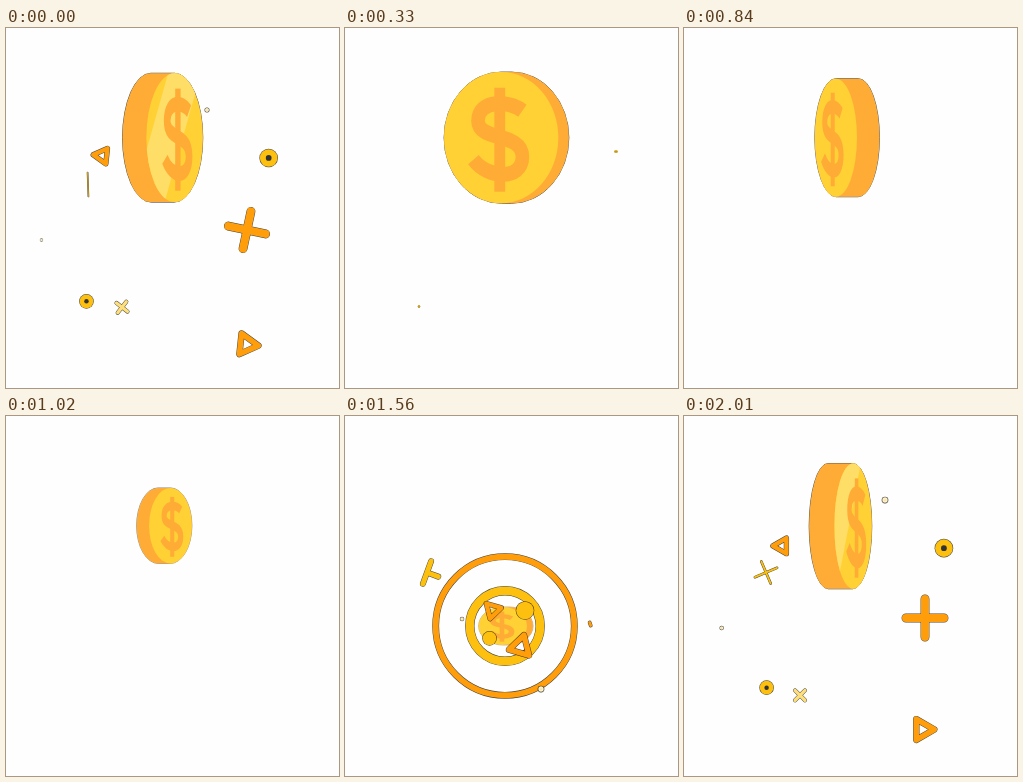
An HTML page with a canvas for the animation above (2.04 s loop, 333 by 360 pixels).

```html
<!DOCTYPE html>
<html>
<head>
<meta charset="utf-8">
<style>
html, body { margin: 0; height: 100%; overflow: hidden; background: #fefefe; }
canvas { display: block; }
</style>
</head>
<body>
<canvas id="stage" width="333" height="360"></canvas>
<script>
const ctx = document.getElementById('stage').getContext('2d');
const LOOP = 2040, START = 1300, CX = 160, CY = 210;
const ORANGE = '#ff9d0a', YELLOW = '#fdc00f', PALE = '#ffdf7b';
const FACE = '#ffd135', RIM = '#ffac37', SHINE = '#ffde68', EDGE = '#000b';
const DOLLAR = new Path2D('M25 -27C12 -37 -24 -39 -24 -17C-24 4 25 -6 25 19C25 43 -14 41 -29 22');
const DEG = Math.PI / 180;

const clamp = u => Math.min(1, Math.max(0, u));
const sineIn = u => 1 - Math.cos(clamp(u) * Math.PI / 2);
const sineInOut = u => (1 - Math.cos(clamp(u) * Math.PI)) / 2;

// Linear keyframes: time, value, time, value, ...
function key(t, ...k) {
  if (t <= k[0]) return k[1];
  for (let i = 2; i < k.length; i += 2)
    if (t < k[i]) return k[i - 1] + (k[i + 1] - k[i - 1]) * (t - k[i - 2]) / (k[i] - k[i - 2]);
  return k[k.length - 1];
}

// Stroke the current path with a fine dark edge
function outline(color, width) {
  ctx.lineCap = ctx.lineJoin = 'round';
  ctx.strokeStyle = EDGE;
  ctx.lineWidth = width + 0.9;
  ctx.stroke();
  ctx.strokeStyle = color;
  ctx.lineWidth = width;
  ctx.stroke();
}

function at(x, y, angle, scale, draw) {
  if (scale <= 0) return;
  ctx.save();
  ctx.translate(x, y);
  ctx.rotate(angle * DEG);
  ctx.scale(scale, scale);
  draw();
  ctx.restore();
}

// r is the outer radius
function ring(r, color) {
  if (r <= 0 || r > 136) return;
  const width = Math.min(11.5 - 0.077 * r, r);
  ctx.beginPath();
  ctx.arc(CX, CY, r - width / 2, 0, 7);
  outline(color, width);
}

function triangle(x, y, angle, scale, r, width) {
  at(x, y, angle, scale, () => {
    ctx.beginPath();
    for (let i = 0; i < 3; i++)
      ctx.lineTo(r * Math.cos(i * 120 * DEG), r * Math.sin(i * 120 * DEG));
    ctx.closePath();
    outline(ORANGE, width);
  });
}

// Two bars; each is drawn from one end to the other
function cross(x, y, angle, scale, arm, width, color, first = 1, second = 1) {
  at(x, y, angle, scale, () => {
    ctx.beginPath();
    if (first > 0) {
      ctx.moveTo(0, arm);
      ctx.lineTo(0, arm - 2 * arm * first);
    }
    if (second > 0) {
      ctx.moveTo(arm, 0);
      ctx.lineTo(arm - 2 * arm * second, 0);
    }
    outline(color, width);
  });
}

function disc(r, color) {
  ctx.beginPath();
  ctx.arc(0, 0, r, 0, 7);
  ctx.fillStyle = color;
  ctx.fill();
}

function dot(x, y, scale, r, hole) {
  at(x, y, 0, scale, () => {
    disc(r + 0.3, EDGE);
    disc(r - 0.2, YELLOW);
    disc(r * 0.32 * hole, '#333');
  });
}

function spark(x, y, scale) {
  at(x, y, 0, scale, () => {
    ctx.beginPath();
    ctx.arc(0, 0, 1, 0, 7);
    outline('#fff0c0', 1.6);
  });
}

function coin(t) {
  const shrink = 1 - sineIn((t - 2720) / 558);
  const sx = shrink * key(t, 1400, 0, 1560, 0.45, 1710, 0.56, 1860, 0.79, 2010, 0.98, 2060, 1);
  const sy = shrink * key(t, 1400, 0, 1560, 0.29, 1710, 0.4, 1860, 0.7, 2010, 0.955, 2060, 1);
  if (sx < 0.01) return;
  let turn = 150 - 184 * sineInOut((t - 1595) / 920) - 180 * sineIn((t - 2626) / 640);
  turn -= 180 * Math.round(turn / 180);
  const depth = 27 * Math.sin(turn * DEG), rx = 62 * Math.cos(turn * DEG), ry = 65.6;
  const front = 0.36 * depth, back = -0.64 * depth;

  ctx.save();
  ctx.translate(CX, CY - 100.3 * sineInOut((t - 1560) / 470));
  ctx.scale(sx, sy);
  ctx.beginPath();
  ctx.ellipse(Math.min(front, back), 0, rx, ry, 0, Math.PI / 2, Math.PI * 1.5);
  ctx.ellipse(Math.max(front, back), 0, rx, ry, 0, -Math.PI / 2, Math.PI / 2);
  ctx.closePath();
  outline(RIM, 0.1);
  ctx.fillStyle = RIM;
  ctx.fill();

  ctx.beginPath();
  ctx.ellipse(front, 0, rx, ry, 0, 0, 7);
  ctx.fillStyle = FACE;
  ctx.fill();
  ctx.clip();

  // Slanted light band sweeping down the face
  const slant = 1.55, low = 0.45 + (t - LOOP) / 37, high = low - 1.8;
  ctx.save();
  ctx.translate(front, 0);
  ctx.scale(rx, ry);
  ctx.beginPath();
  ctx.moveTo(-1, high + slant);
  ctx.lineTo(1, high - slant);
  ctx.lineTo(1, low - slant);
  ctx.lineTo(-1, low + slant);
  ctx.fillStyle = SHINE;
  ctx.fill();
  ctx.restore();

  ctx.translate(depth / 2, 0);
  ctx.scale(rx / 63, 1);
  ctx.strokeStyle = ctx.fillStyle = RIM;
  ctx.lineWidth = 15;
  ctx.lineCap = 'butt';
  ctx.stroke(DOLLAR);
  ctx.fillRect(-6, -50, 12, 104);
  ctx.restore();
}

function particles(t) {
  const go = key(t, 1440, 0, 1560, 0.18, 1710, 0.43, 1860, 0.7, 2010, 0.9, 2040, 0.925, 2370, 1);
  const grow = key(t, 1440, 0, 1550, 1);
  const fade = grow * key(t, 2070, 1, 2280, 0);
  const dots = grow * key(t, 2100, 1, 2370, 0.17, 2400, 0);
  const hole = key(t, 1560, 0, 1700, 1);
  const spin = key(t, 1410, -28, 1710, 0, 2040, 66, 2370, 132);

  triangle(CX + 87 * go, CY + 115 * go, 60 + spin, fade, 12, 5.5);
  triangle(CX - 69 * go, CY - 89 * go, spin, fade, 9, 4.4);
  dot(CX + 111 * go, CY - 86.5 * go, dots, 9, hole);
  dot(CX - 86 * go, CY + 68.5 * go, dots, 7, hole);

  cross(key(t, 1710, 243, 2010, 241), 202, key(t, 1560, -20, 1710, 19, 2010, 90, 2040, 102, 2280, 190), fade,
    key(t, 1560, 8, 1710, 17, 2010, 19), key(t, 1530, 2, 1710, 7, 2010, 8), ORANGE,
    key(t, 1530, 0, 1680, 1), key(t, 1650, 0, 1710, 0.5, 1770, 1));
  cross(82, 156.5, key(t, 1560, 20, 1710, 45, 2010, 67, 2040, 88),
    key(t, 2040, 1, 2070, 0), 12, key(t, 1440, 4, 1560, 5, 1710, 5.5, 1860, 5, 2010, 1.8, 2040, 0.8), YELLOW,
    key(t, 1440, 0, 1530, 1, 2010, 1, 2040, 0), key(t, 1530, 0, 1560, 0.5, 1600, 1));
  cross(116, 279.3, key(t, 2010, 45, 2040, 38, 2160, 10),
    key(t, 1690, 0, 1860, 1, 2070, 1, 2220, 0), 7, 3.2, PALE);

  const drift = go ** 0.65;
  const tiny = grow * key(t, 2010, 1, 2130, 0);
  spark(CX - 131 * drift, key(t, 1560, 203, 1710, 206, 2010, 212), tiny);
  spark(key(t, 1560, 196, 2010, 201),
    key(t, 1560, 273, 1710, 200, 1860, 134, 2010, 84, 2040, 82), 1.5 * tiny);
}

function frame(now) {
  let t = Math.floor((now % LOOP) / 30) * 30;
  if (t < START) t += LOOP;
  ctx.clearRect(0, 0, 333, 360);
  ring(0.52 * (t - 1421), ORANGE);
  ring(0.487 * (t - 1479), YELLOW);
  coin(t);
  particles(t);
}

const begin = performance.now();
(function tick() {
  frame(performance.now() - begin);
  requestAnimationFrame(tick);
})();
</script>
</body>
</html>
```
